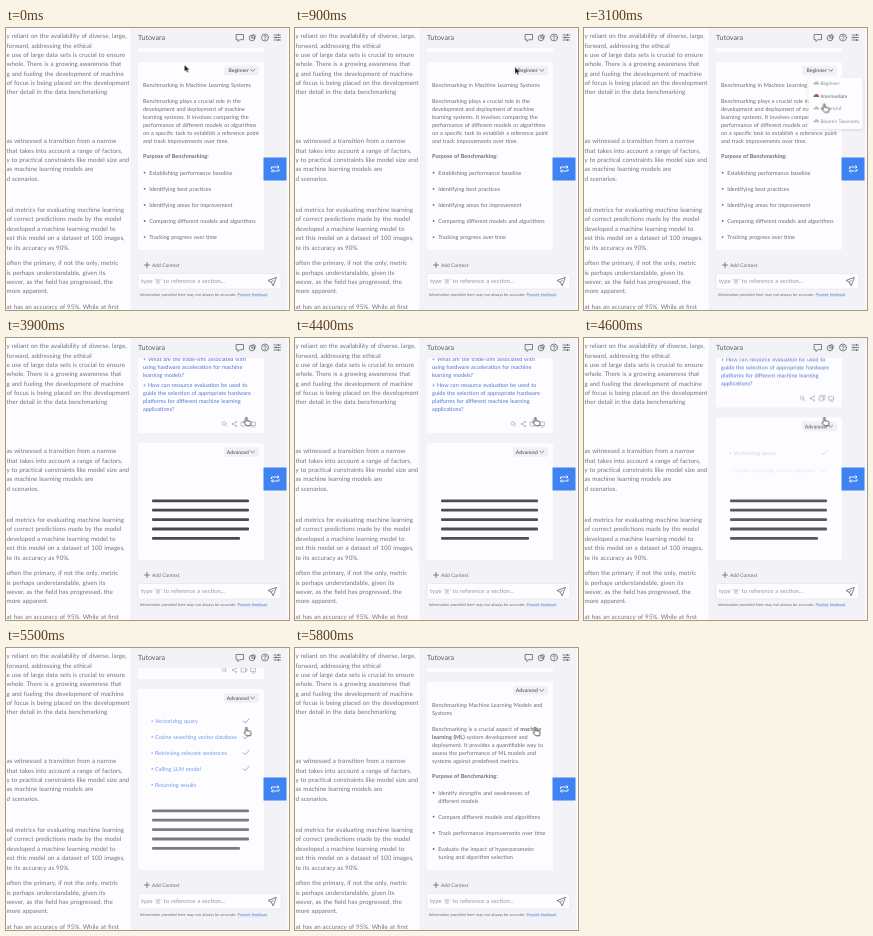
Animation of 283 by 282 pixels, one loop 6.4 s. Source, as an HTML page:

```html
<!DOCTYPE html>
<html lang="en">
<head>
<meta charset="utf-8">
<title>Study assistant panel</title>
<style>
  html, body { margin: 0; width: 100%; height: 100%; overflow: hidden; background: #fdfcfe; }
  svg { display: block; width: 100vw; height: 100vh; }
  text { font-family: Lato, "Open Sans", sans-serif; font-size: 5.55px; fill: #6b6b71; word-spacing: .06em; text-rendering: geometricPrecision; white-space: pre; }
  .page text { font-size: 6.25px; fill: #747478; }
  .blue text { fill: #4f74dc; }
  .steps text { fill: #6f9aea; }
  .panel { fill: #f3f2f6; }
  .card { fill: #fdfcfe; }
  .bold { font-weight: 700; }
  .line { fill: none; stroke: #64656b; stroke-width: .8; stroke-linecap: round; stroke-linejoin: round; }
  .faint { stroke: #b1b4be; }
  .check { stroke: #6f9bea; }

  .anim, .step { animation: 6400ms linear infinite; }
  .first { animation-name: first; }
  .loading { animation-name: loading; }
  .final { animation-name: final; }
  .menu { animation-name: menu; }
  .grow { animation-name: grow; }
  .bars { animation-name: bars; }
  .arrow { animation-name: arrow; }
  .hand { animation-name: hand; }
  .pointer { animation-name: pointer; }
  .step { animation-name: step; }

  @keyframes first { 0%, 90.624% { opacity: 1 } 90.625%, 99.99% { opacity: 0 } 100% { opacity: 1 } }
  @keyframes loading {
    0% { opacity: 0 }
    57.8125% { opacity: 0; animation-timing-function: steps(3, start) }
    62.5%, 90.624% { opacity: 1 }
    90.625%, 100% { opacity: 0 }
  }
  @keyframes final { 0%, 90.624% { opacity: 0 } 90.625%, 100% { opacity: 1 } }
  @keyframes menu {
    0% { opacity: 0 }
    20.3125% { opacity: 0; animation-timing-function: steps(3, start) }
    25% { opacity: 1 }
    57.8125% { opacity: 1; animation-timing-function: steps(3, start) }
    62.5%, 100% { opacity: 0 }
  }
  @keyframes grow {
    0% { transform: translateY(64px) }
    70.3125% { transform: translateY(64px); animation-timing-function: steps(5, start) }
    78.125%, 100% { transform: none }
  }
  @keyframes bars {
    0% { opacity: 1 }
    68.75% { opacity: 1; animation-timing-function: steps(7, start) }
    79.6875% { opacity: .8; animation-timing-function: steps(7, start) }
    90.625%, 100% { opacity: .68 }
  }
  @keyframes step {
    0% { opacity: 0; transform: translateY(6px) }
    70.3125% { opacity: 0; transform: translateY(6px); animation-timing-function: steps(5, start) }
    78.125%, 100% { opacity: 1; transform: none }
  }
  @keyframes arrow { 0%, 15.624% { opacity: 1 } 15.625%, 100% { opacity: 0 } }
  @keyframes hand { 0%, 15.624% { opacity: 0 } 15.625%, 100% { opacity: 1 } }
  @keyframes pointer {
    0% { transform: translate(178.5px, 37px) }
    3.125% { transform: translate(178.5px, 37px); animation-timing-function: steps(3, start) }
    7.8125% { transform: translate(196px, 38px) }
    9.375% { transform: translate(196px, 38px); animation-timing-function: steps(5, start) }
    17.1875% { transform: translate(226px, 39.5px) }
    28.125% { transform: translate(226px, 39.5px); animation-timing-function: steps(7, jump-none) }
    39.0625% { transform: translate(234.5px, 66px); animation-timing-function: steps(7, start) }
    50% { transform: translate(237.5px, 75.5px) }
    57.8125% { transform: translate(237.5px, 75.5px); animation-timing-function: steps(3, start) }
    62.5%, 99.99% { transform: translate(237.5px, 79px) }
    100% { transform: translate(178.5px, 37px) }
  }
</style>
</head>
<body>
<svg viewBox="0 0 283 282" preserveAspectRatio="none">
  <defs>
    <clipPath id="scroll"><rect x="124" y="20" width="157" height="208"/></clipPath>
    <clipPath id="cardClip"><rect x="132" y="0" width="126" height="222" rx="2"/></clipPath>
    <filter id="soft" x="-20%" y="-20%" width="140%" height="150%">
      <feDropShadow dx="0" dy="1" stdDeviation="1.5" flood-color="#445" flood-opacity=".16"/>
    </filter>
  </defs>

  <g class="page" id="page"></g>

  <rect class="panel" x="124.5" width="157" height="282"/>
  <text x="132" y="11.8" style="font-size:7.1px;fill:#5c5d63">Tutovara</text>
  <g class="line">
    <path d="M230.5 6.5h7v5.2h-3.6l-2 1.8v-1.8h-1.4z"/>
    <circle cx="246" cy="10" r="2.8"/><path d="M246 10V7.2M246 10h2.8M247.5 6.3a3 3 0 0 1 2.2 2.2"/>
    <circle cx="259" cy="9.5" r="3.5"/><path d="M257.9 8.6a1.1 1.1 0 1 1 1.6 1q-.5.3-.5.8M259 11.5v.1"/>
    <path d="M268 7h6.5M268 9.5h6.5M268 12h6.5M272.5 6.3v1.4M270 8.8v1.4M272.5 11.3v1.4"/>
  </g>

  <g clip-path="url(#scroll)">
    <rect class="card" x="132" y="10" width="126" height="14" rx="2"/>
    <rect class="card" x="132" y="34" width="126" height="188" rx="2"/>
    <g class="anim first" id="first"></g>
    <g class="anim final" id="final"></g>

    <g class="anim loading">
      <rect class="panel" x="124.5" y="20" width="157" height="208"/>
      <g clip-path="url(#cardClip)">
        <g class="anim grow">
          <rect class="card" x="132" y="-120" width="126" height="151" rx="2"/>
          <rect class="card" x="132" y="41" width="126" height="220" rx="2"/>
          <g class="blue" id="questions"></g>
          <g class="line faint">
            <circle cx="218" cy="21.5" r="1.8"/><path d="M219.4 22.9l1.4 1.4"/>
            <path d="M230 20l-3.6 2 3.6 2"/><circle cx="230" cy="20" r=".5"/><circle cx="226.4" cy="22" r=".5"/><circle cx="230" cy="24" r=".5"/>
            <path d="M235.5 20h4v4h-4zM237 20v-1h4v4h-1M245 20h4.5v3.5h-4.5zM246 25h3"/>
          </g>
          <g id="loadPill"></g>
          <g class="steps" id="steps"></g>
        </g>
        <g class="anim bars" id="bars"></g>
      </g>
    </g>
  </g>

  <path class="line" d="M138.5 237h5M141 234.5v5"/>
  <text x="146" y="238.8" style="font-size:4.9px">Add Context</text>
  <rect class="card" x="132" y="245.5" width="143" height="15.5" rx="2" stroke="#e5e4ea" stroke-width=".6"/>
  <text x="135" y="255.3" style="font-size:5.9px;fill:#97989f">type '@' to reference a section...</text>
  <path class="line" d="M270 249.5l-8 3 3.3 1.7 1.7 3.3zM265.3 254.2l2-2"/>
  <text x="134" y="267.9" style="font-size:3.95px;fill:#6b6d75">Information provided here may not always be accurate. <tspan fill="#4f74dc" text-decoration="underline">Provide feedback</tspan></text>

  <rect x="257.5" y="129.5" width="23" height="23" fill="#3f82f2"/>
  <path d="M265.5 141v-2h7.5l-1.6-1.6M273 139l-1.6 1.6M273 141v2h-7.5l1.6-1.6M265.5 143l1.6 1.6" fill="none" stroke="#fff" stroke-width=".9"/>

  <g class="anim menu">
    <rect class="card" x="224.5" y="49.5" width="54" height="51.5" rx="2" filter="url(#soft)"/>
    <g id="menu"></g>
  </g>

  <g class="anim pointer">
    <path class="anim arrow" d="M0 0v6.5l1.6-1.4 1 2.3 1.2-.5-1-2.2h2.1z" fill="#111" stroke="#fff" stroke-width=".3"/>
    <path class="anim hand" d="M2 5.2V1.2a.8.8 0 0 1 1.6 0v2.5l3.1.6q.9.2.8 1.2l-.5 3.3H3.2L.6 5.9q.3-1 1.4-.7z" fill="#fff" stroke="#333" stroke-width=".8" stroke-linejoin="round"/>
  </g>
</svg>

<script>
  const $ = id => document.getElementById(id);

  function add(parent, tag, attrs, text) {
    const el = document.createElementNS("http://www.w3.org/2000/svg", tag);
    for (const k in attrs) el.setAttribute(k, attrs[k]);
    if (text) el.textContent = text;
    parent.appendChild(el);
    return el;
  }

  // Lines are separated by "|"; y is the first baseline.
  function lines(parent, x, y, pitch, str, cls = "") {
    str.split("|").forEach((s, i) => add(parent, "text", { x, y: y + i * pitch, class: cls }, s));
  }

  function bullet(parent, y, str) {
    add(parent, "circle", { cx: 138.6, cy: y - 1.8, r: .9, fill: "#6b6b71" });
    lines(parent, 143.3, y, 8, str);
  }

  function pill(parent, cy, label) {
    add(parent, "rect", { x: 218, y: cy - 4.8, width: 35, height: 9.6, rx: 2, fill: "#f1f0f4" });
    add(parent, "text", { x: label === "Beginner" ? 222.5 : 220.8, y: cy + 1.8, style: "font-size:5px;font-weight:700" }, label);
    add(parent, "path", { class: "line", d: `M244.8 ${cy - 1}l1.9 1.9 1.9-1.9` });
  }

  const page = $("page");
  lines(page, .5, 10.2, 9.33, "y reliant on the availability of diverse, large,|forward, addressing the ethical|e use of large data sets is crucial to ensure|whole. There is a growing awareness that|g and fueling the development of machine|of focus is being placed on the development|ther detail in the data benchmarking");
  lines(page, .5, 115.2, 9.4, "as witnessed a transition from a narrow|that takes into account a range of factors,|y to practical constraints like model size and|as machine learning models are|d scenarios.");
  lines(page, .5, 184, 9.4, "ed metrics for evaluating machine learning|of correct predictions made by the model|developed a machine learning model to|est this model on a dataset of 100 images,|te its accuracy as 90%.");
  lines(page, .5, 237.2, 9.4, "often the primary, if not the only, metric|is perhaps understandable, given its|wever, as the field has progressed, the|more apparent.");
  lines(page, .5, 281, 9.4, "at has an accuracy of 95%. While at first");

  const first = $("first");
  pill(first, 42.5, "Beginner");
  lines(first, 137, 59, 8, "Benchmarking in Machine Learning Systems");
  lines(first, 137, 75, 7.9, "Benchmarking plays a crucial role in the|development and deployment of machine|learning systems. It involves comparing the|performance of different models or algorithms|on a specific task to establish a reference point|and track improvements over time.");
  lines(first, 137, 130.4, 8, "Purpose of Benchmarking:", "bold");
  ["Establishing performance baseline", "Identifying best practices", "Identifying areas for improvement", "Comparing different models and algorithms", "Tracking progress over time"]
    .forEach((s, i) => bullet(first, 146.5 + i * 16.1, s));

  const final = $("final");
  pill(final, 42.5, "Advanced");
  lines(final, 137, 59, 8, "Benchmarking Machine Learning Models and|Systems");
  const lead = add(final, "text", { x: 137, y: 83 }, "Benchmarking is a crucial aspect of ");
  add(lead, "tspan", { class: "bold" }, "machine");
  const next = add(final, "text", { x: 137, y: 90.9 });
  add(next, "tspan", { class: "bold" }, "learning (ML)");
  add(next, "tspan", {}, " system development and");
  lines(final, 137, 98.8, 7.9, "deployment. It provides a quantifiable way to|assess the performance of ML models and|systems against predefined metrics.");
  lines(final, 137, 130.4, 8, "Purpose of Benchmarking:", "bold");
  bullet(final, 146.5, "Identify strengths and weaknesses of|different models");
  bullet(final, 170.5, "Compare different models and algorithms");
  bullet(final, 186.6, "Track performance improvements over time");
  bullet(final, 202.8, "Evaluate the impact of hyperparameter|tuning and algorithm selection");

  const ask = $("questions");
  lines(ask, 137, -41, 8, "+ What are the trade-offs associated with|using hardware acceleration for machine|learning models?");
  lines(ask, 137, -15, 8, "+ How can resource evaluation be used to|guide the selection of appropriate hardware|platforms for different machine learning|applications?");
  pill($("loadPill"), 50, "Advanced");

  ["Vectorizing query", "Cosine searching vector database", "Retrieving relevant sentences", "Calling LLM model", "Returning results"].forEach((s, i) => {
    const y = 75 + i * 15.9;
    const g = add($("steps"), "g", { class: "step", style: `animation-delay:${i * 100}ms` });
    add(g, "circle", { cx: 146.2, cy: y - 1.8, r: .8, fill: "#6f9aea" });
    add(g, "text", { x: 149, y }, s);
    if (i < 4) add(g, "path", { class: "line check", d: `M237.3 ${y - 2}l1.8 1.9 4-4.2` });
  });

  for (let i = 0; i < 5; i++)
    add($("bars"), "rect", { x: 146, y: 161.4 + i * 9.4, width: i < 4 ? 97 : 88, height: 2.8, rx: 1, fill: "#48494f" });

  ["Beginner", "Intermediate", "Advanced", "Bloom's Taxonomy"].forEach((s, i) => {
    const y = 57 + i * 12.6, active = i === 1;
    add($("menu"), "path", { d: `M229.5 ${y - .6}v-1.5l1.3-.4.8-1.1h1.8l.8 1.2 1 .4v1.4z`, fill: active ? "#b8505c" : "#b9bac2" });
    add($("menu"), "text", { x: 236.5, y, style: `font-size:4.8px;fill:${active ? "#64656b" : "#8c8d94"}` }, s);
  });
</script>
</body>
</html>
```
